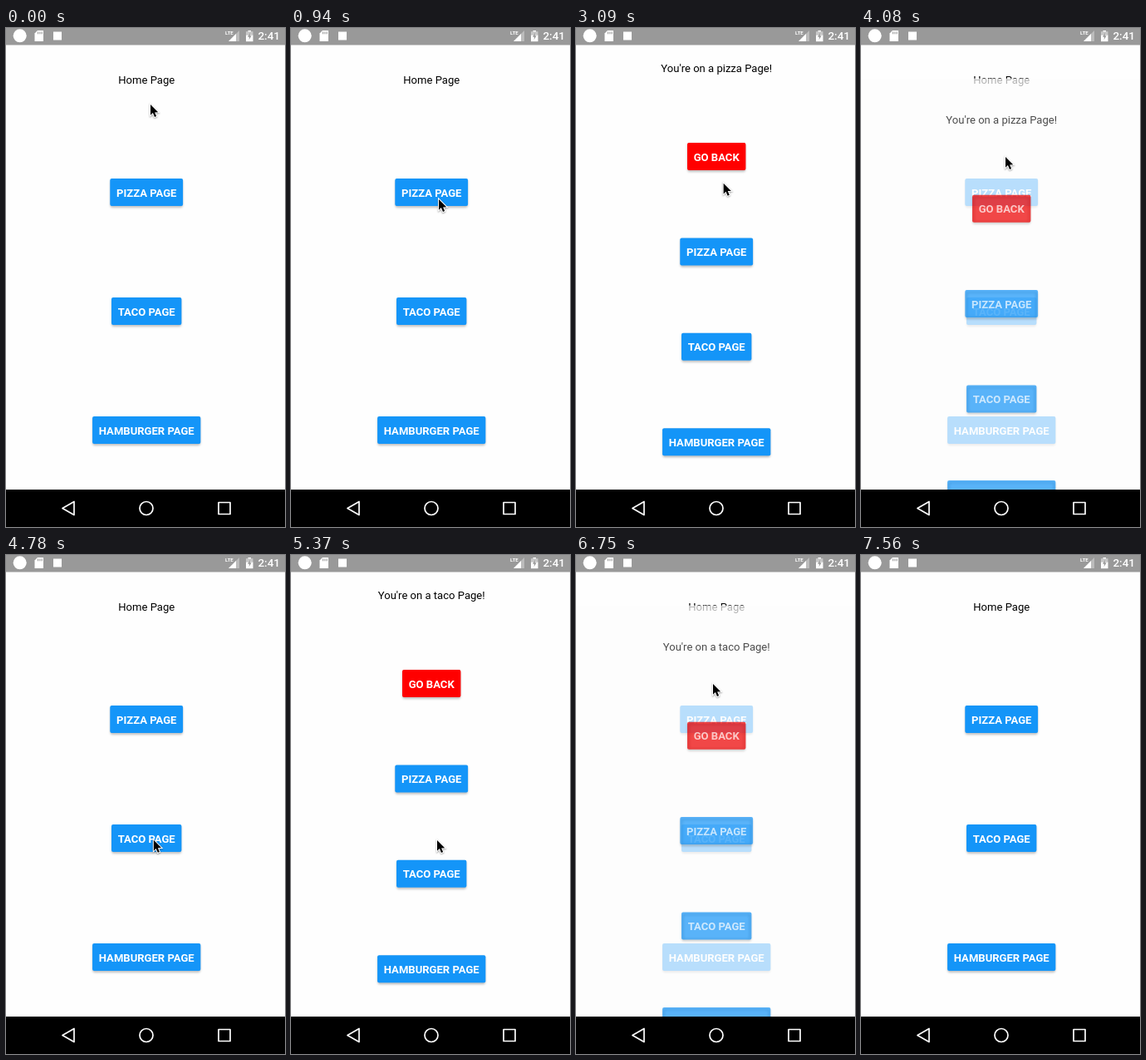
Recreate the animation shown at these times as an HTML page with a canvas. Size 336x600 px, loop 8160 ms.

```html
<!DOCTYPE html>
<html lang="en">
<head>
<meta charset="utf-8">
<title>Page navigation</title>
<style>
html, body { margin: 0; width: 336px; height: 600px; overflow: hidden; background: #fefefe; }
canvas { display: block; }
</style>
</head>
<body>
<canvas id="stage" width="336" height="600"></canvas>
<script>
const ctx = document.getElementById('stage').getContext('2d');
const LOOP = 8160, REFRESH = 55;
const MID = 169.2, BTN_H = 33, DROP = 210, PAGE_TOP = -2;
const BLUE = '#1495f8', RED = '#ff0000', PAPER = '#fefefe';
const LABEL_FONT = 'bold 13.07px', FOODS = ['PIZZA PAGE', 'TACO PAGE', 'HAMBURGER PAGE'];

const home = { title: 'Home Page', base: 67, labels: FOODS, top: 181, gap: 143 };

// tap: press on the home page, enter: page appears, back: press on GO BACK
const subPage = (food, item, tap, enter, back) => ({
  title: `You're on a ${food} Page!`, base: 52.7,
  labels: ['GO BACK', ...FOODS], top: 138, gap: 114.4, item, tap, enter, back
});
const pages = [subPage('pizza', 0, 2260, 2315, 3860), subPage('taco', 1, 5140, 5255, 6530)];

// Pointer strokes: start, end, bend and destination of each curve
const moves = [
  { start: 50, end: 470, via: [145, 150], to: [180, 219] },
  { start: 650, end: 940, via: [179, 208], to: [177, 204] },
  { start: 3090, end: 3380, via: [177, 168], to: [173, 153] },
  { start: 4180, end: 4660, via: [176, 240], to: [183, 333] },
  { start: 4720, end: 4840, via: [182, 341], to: [175, 341] },
  { start: 5730, end: 6290, via: [187, 92], to: [164, 153] },
  { start: 7100, end: 7560, via: [145, 330], to: [280, 620] }
];

const clamp = v => Math.min(1, Math.max(0, v));
const stepped = ms => Math.floor(ms / REFRESH) * REFRESH;

function pointerAt(t) {
  let at = [173, 90];
  for (const { start, end, via, to } of moves) {
    if (t < start) break;
    const u = 1 - (1 - clamp((stepped(t - start) + REFRESH) / (end - start + REFRESH))) ** 2;
    at = at.map((a, i) => a * (1 - u) ** 2 + 2 * via[i] * u * (1 - u) + to[i] * u * u);
  }
  return at;
}

function presence({ enter, back }, t) {
  if (t < enter) return 0;
  if (t < back) return 1 - (1 - clamp((stepped(t - enter) + REFRESH) / (3 * REFRESH))) ** 5;
  return 1 - clamp((stepped(t - back) - 50) / 230) ** 4;
}

// Time since the given button was pressed, or -1
function pressAge(page, i, t) {
  const taps = page === home ? pages.filter(p => p.item === i).map(p => p.tap)
    : i === 0 ? [page.back] : [];
  const tap = taps.find(s => t >= s && t < s + 300);
  return tap === undefined ? -1 : stepped(t - tap);
}

function text(str, x, y, font, color, align = 'center') {
  ctx.font = `${font} Roboto, sans-serif`;
  ctx.textAlign = align;
  ctx.fillStyle = color;
  ctx.fillText(str, x, y);
}

function fillPoly(color, ...points) {
  ctx.fillStyle = color;
  ctx.beginPath();
  points.forEach(([x, y]) => ctx.lineTo(x, y));
  ctx.closePath();
  ctx.fill();
}

function rect(color, x, y, w, h) {
  ctx.fillStyle = color;
  ctx.fillRect(x, y, w, h);
}

function disc(color, x, y, r) {
  ctx.fillStyle = color;
  ctx.beginPath();
  ctx.arc(x, y, r, 0, 7);
  ctx.fill();
}

// Hollow elevation shadow, visible through a fading button
function shadow(x, y, w) {
  ctx.save();
  ctx.shadowColor = 'rgba(0,0,0,.3)';
  ctx.shadowBlur = 3;
  ctx.shadowOffsetX = 1000;
  ctx.shadowOffsetY = 1.8;
  ctx.beginPath();
  ctx.roundRect(x - 999.5, y, w - 1, BTN_H, 2);
  ctx.roundRect(x - 997, y + 2, w - 6, BTN_H - 5, 2);
  ctx.fillStyle = '#000';
  ctx.fill('evenodd');
  ctx.restore();
}

function button(label, y, age, pointer) {
  ctx.font = `${LABEL_FONT} Roboto, sans-serif`;
  const w = ctx.measureText(label).width + 15.4, x = MID - w / 2;
  shadow(x, y, w);
  ctx.beginPath();
  ctx.roundRect(x, y, w, BTN_H, 2);
  ctx.fillStyle = label === 'GO BACK' ? RED : BLUE;
  ctx.fill();
  if (age >= 0) {
    ctx.save();
    ctx.clip();
    disc('rgba(0,0,0,.07)', ...pointer, 32 + age * 0.4);
    ctx.restore();
  }
  text(label, MID, y + 21.6, LABEL_FONT, '#fff');
}

function drawPage(page, alpha, t, pointer) {
  const dy = (1 - alpha) * DROP;
  ctx.globalAlpha = alpha;
  rect(PAPER, 0, dy + PAGE_TOP, 336, 602);
  text(page.title, MID, page.base + dy, '13.07px', '#000');
  page.labels.forEach((label, i) =>
    button(label, page.top + page.gap * i + dy, pressAge(page, i, t), pointer));
  ctx.globalAlpha = 1;
}

function statusBar() {
  rect('#999', 0, 0, 336, 20.5);
  disc('#fff', 16.7, 9.3, 8);
  rect('#fff', 57, 4.5, 10, 10);

  // Memory card
  fillPoly('#fff', [38, 3], [45, 3], [45, 16], [34.5, 16], [34.5, 6.5]);
  for (let x = 38; x < 43; x += 2.3) rect('#999', x, 4.5, 1.1, 2.8);

  // Signal
  fillPoly('rgba(255,255,255,.35)', [281, 3], [281, 16], [268, 16]);
  fillPoly('#fff', [277, 7], [277, 16], [268, 16]);
  text('LTE', 264, 8, 'bold 6px', '#fff', 'left');

  // Battery
  rect('rgba(255,255,255,.45)', 289, 4.2, 8.5, 4.3);
  rect('#fff', 291.5, 3, 3.5, 1.4);
  rect('#fff', 289, 8.5, 8.5, 7.7);
  fillPoly('#999', [294, 5.5], [291, 10.8], [293, 10.8], [292.6, 14.2], [295.6, 9.3], [293.6, 9.3]);
  text('2:41', 330, 14.2, '500 13.5px', '#fff', 'right');
}

function navBar() {
  rect('#000', 0, 555, 336, 45);
  ctx.strokeStyle = '#fff';
  ctx.lineWidth = 1.7;
  ctx.lineJoin = 'round';
  ctx.stroke(new Path2D('M68 577.5L82 569.5V585.5Z'));
  ctx.beginPath();
  ctx.arc(169, 577.5, 8, 0, 7);
  ctx.stroke();
  ctx.strokeRect(256, 570.5, 14, 14);
}

const arrow = new Path2D('M0 0V12.8L2.9 10.1L5 15L7.1 14.1L5.1 9.4L9.2 9.2Z');

function drawPointer([x, y]) {
  ctx.save();
  ctx.translate(x + 1, y + 2);
  ctx.lineJoin = 'miter';
  ctx.miterLimit = 3;
  ctx.lineWidth = 2;
  ctx.strokeStyle = '#fff';
  ctx.shadowColor = 'rgba(0,0,0,.4)';
  ctx.shadowBlur = 2;
  ctx.shadowOffsetY = 0.8;
  ctx.stroke(arrow);
  ctx.shadowColor = 'transparent';
  ctx.fillStyle = '#000';
  ctx.fill(arrow);
  ctx.restore();
}

function draw(t) {
  const pointer = pointerAt(t);
  drawPage(home, 1, t, pointer);
  for (const page of pages) {
    const alpha = presence(page, t);
    if (alpha > 0) drawPage(page, alpha, t, pointer);
  }
  statusBar();
  navBar();
  drawPointer(pointer);
}

const begin = performance.now();
function tick() {
  draw((performance.now() - begin) % LOOP);
  requestAnimationFrame(tick);
}
tick();
</script>
</body>
</html>
```
